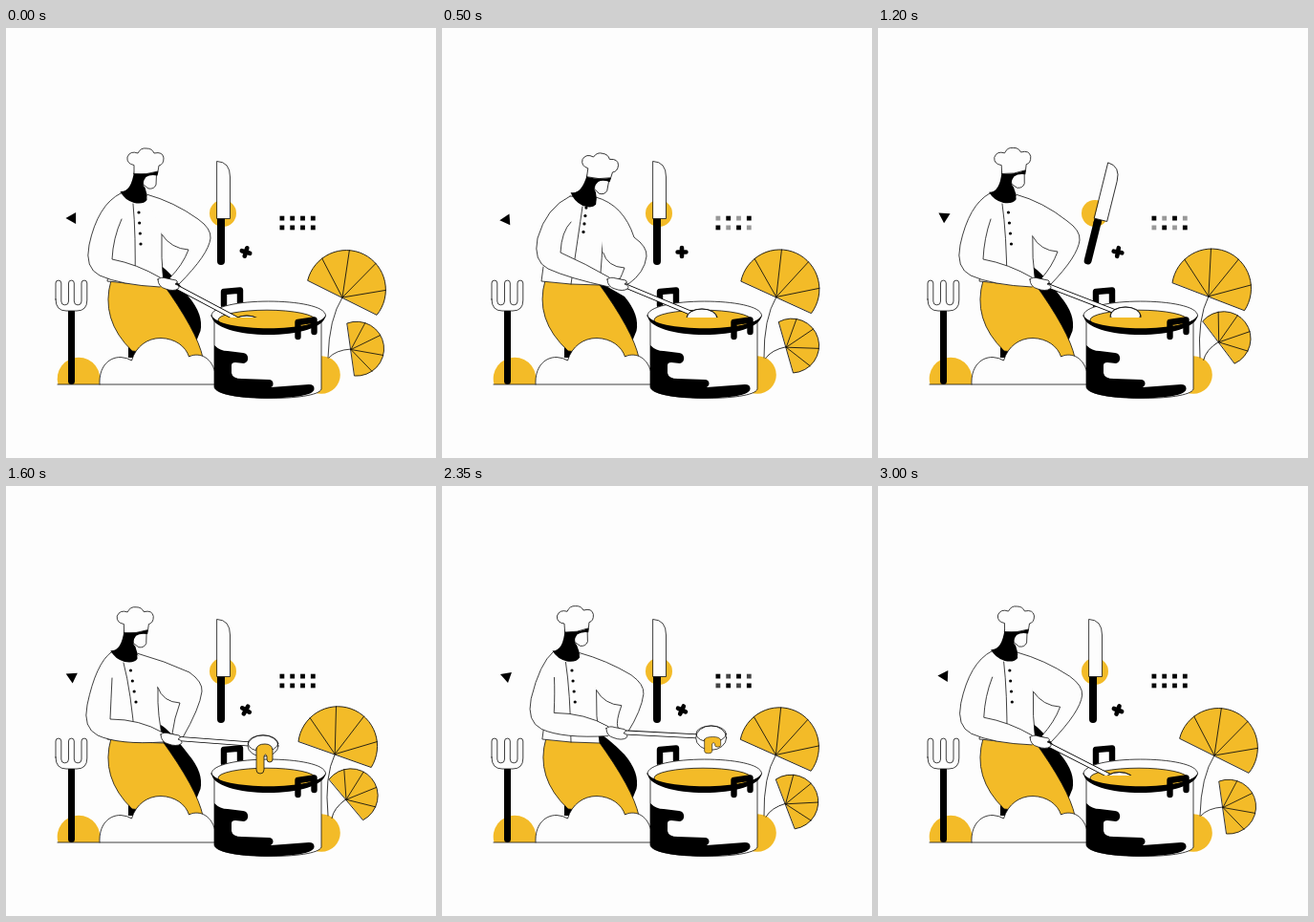
An HTML page that plays this animation: 450x450 px, repeating every 3.05 s.

```html
<!DOCTYPE html>
<html lang="en">
<head>
<meta charset="utf-8">
<title>Cook at the pot</title>
<style>
  html, body { margin: 0; width: 100%; height: 100%; overflow: hidden; background: #fdfdfd; }
  svg { display: block; width: 100%; height: 100%; }
  .line { fill: none; stroke: #111; stroke-width: .8; stroke-linecap: round; stroke-linejoin: round; }
  .white { fill: #fdfdfd; }
  .gold { fill: #f3bb28; }
  .bar { fill: none; stroke: #000; stroke-linecap: round; stroke-linejoin: round; }
</style>
</head>
<body>
<svg viewBox="0 0 450 450">
  <defs>
    <clipPath id="aboveSoup"><path d="M0 0H450V301L300 303H240L0 303Z"/></clipPath>
  </defs>

  <path id="triangle" d="M-7 0 3.6-5.9V5.9Z"/>
  <path id="plus" class="bar" stroke-width="4.6" d="M-4.4 0H4.4M0-4.4V4.4"/>
  <g id="dots"></g>

  <circle class="gold" cx="227" cy="194" r="14"/>
  <g id="knife">
    <path class="bar" stroke-width="8" d="M225 203V244"/>
    <path d="M221 199h8v6h-8z"/>
    <path class="line white" d="M221 139.5Q234.500 140 234.500 156V199.500H221Z"/>
  </g>

  <path class="gold" d="M54.5 373A22.3 22.3 0 1 1 97.5 373Z"/>
  <path class="bar" stroke-width="7" d="M68.5 297V369.5"/>
  <path id="fork" class="line white"/>

  <circle class="gold" cx="330" cy="363" r="19.8"/>
  <g id="bigLeaf"><path class="line" d="M337 345Q338 304 352 282"/></g>
  <g id="smallLeaf"><path class="line" d="M338 345Q345 337 361 336"/></g>

  <path d="M128 322V345H140V330Z"/>
  <path id="hip"/>
  <path id="apron" class="line gold"/>
  <path id="torso" class="line white"/>
  <path id="placket" class="line"/>
  <g id="buttons"></g>
  <path id="rightArm" class="line white"/>

  <path class="line white" d="M98 373C97 355 107 344.500 120 344.500Q127 345 131.500 348C136 333 148 324.500 162 324.500C177 325 188 333 191.500 344C199 340 214 341 219 361V373"/>
  <path class="line" d="M54 373H219"/>

  <path class="white line" d="M218 304V376C222 391 326 391 330 378V304Z"/>
  <path d="M218 332Q224 338 232 338L248 340A5.6 5.6 0 0 1 249 351L240 350Q236 350 236 353V361Q237 367 247 367L276 368A4.2 4.2 0 0 1 277 376L317 373Q323 373 322.500 378Q322 383 306 385.500C275 389.500 222 388 218 376Z"/>
  <path class="bar" stroke-width="6.4" stroke-linejoin="miter" d="M228 290V276L245 274.5V287"/>
  <path class="line white" d="M215 301C215 281 334 281 334.500 301C332 318 218 318 215 301Z"/>
  <ellipse class="gold line" cx="273" cy="305.500" rx="51" ry="10.300"/>
  <path d="M215 300C215 328 334 328 334.500 300C331 319 219 319 215 300Z"/>
  <path class="bar" stroke-width="6.4" stroke-linejoin="miter" d="M305.500 323V308L322.500 305.500V318"/>

  <g clip-path="url(#aboveSoup)">
    <path id="handle" class="bar" stroke-width="5"/>
    <path id="handleCore" class="bar" stroke-width="3.400" style="stroke:#fdfdfd"/>
    <ellipse id="bowl" class="line white" rx="16"/>
    <ellipse id="lip" class="line" rx="15.800" ry="8.500"/>
    <path id="drip" class="gold line" d="M-8 3V25A4 4 0 0 0 0 25V11Q1.500 7 3 11V14A3 3 0 0 0 9 14V4Q8-2 1-2Q-7-2-8 3Z"/>
  </g>

  <path id="leftArm" class="white"/>
  <path id="leftArmLine" class="line"/>
  <path id="hand" class="line white" d="M-10-3Q-7-6-1-4L9-2Q12 0 8 2Q14 4 11 7Q6 10-2 7Q-10 5-10-3Z"/>

  <g id="head">
    <path class="line white" d="M143 153H157.500L157 164Q155 169 149 168L144 164Z"/>
    <path d="M134 150H159.500L158.500 154.500Q151 153 146.500 156Q141 163 145.500 167Q148 173 147.500 180Q144 185 134 183Q124 180 119.500 171Q131 172 134 150Z"/>
    <path class="line white" d="M134 152.500V143.500Q126 142 127 135Q130 128 138 131Q141 125 147 126Q153 126 155 131Q164 129 165 136Q165 143 160 144L159 150Q147 154 134 152.500Z"/>
  </g>
</svg>
<script>
const LOOP = 3050, STEP = 50;
const TIMES = [0, 500, 1200, 1600, 2050, 2700];

// One value per time in TIMES; the list wraps around.
const TRACKS = {
  neckX:   [0, 14, -3, -10, 0, -8],
  neckY:   [0, 3, 0, 1, 0, 1],
  tilt:    [0, 8, -3, -1, -6, -1],
  handX:   [169, 183, 169, 172, 187, 173],
  handY:   [266, 266, 266, 263, 253, 263],
  leftX:   [86, 99, 85, 84, 98, 85],
  leftY:   [235, 228, 235, 237, 226, 236],
  rightX:  [214, 214, 211, 205, 214, 207],
  rightY:  [219, 238, 221, 214, 218, 215],
  hipX:    [0, -2, 0, 0, -2, 0],
  hipTop:  [249, 265, 250, 250, 262, 250],
  bowlX:   [252, 272, 259, 269, 287, 269],
  bowlY:   [311, 304, 302, 272, 256.5, 281.5],
  bowlR:   [10, 10, 10, 11.2, 12.2, 13],
  drip:    [0, 0, 0, 1, 1, 0],
  knife:   [0, 0, 14, 0, 0, 0],
  triX:    [69.5, 67.3, 69.3, 69, 67.3, 68.3],
  triY:    [199, 200.7, 197.3, 199.5, 200.3, 198],
  triTurn: [0, -4, 33, 26, 5, 38],
  plus:    [17, 0, 11, 30, 9, 45],
  dotA:    [1, .4, 1, 1, 1, 1],
  dotB:    [1, 1, .4, 1, 1, .4],
  bigLeaf: [0, -2, -5.5, -7, -4.5, -.5],
  smallLeaf: [0, -8, -29, -32, -24, -2]
};

const $ = id => document.getElementById(id);
const set = (id, attrs) => {
  for (const name in attrs) $(id).setAttribute(name, attrs[name]);
};
const draw = (id, d) => set(id, { d });
const place = (id, transform) => set(id, { transform });

function add(parent, tag, attrs) {
  const el = document.createElementNS('http://www.w3.org/2000/svg', tag);
  for (const name in attrs) el.setAttribute(name, attrs[name]);
  $(parent).append(el);
  return el;
}

// Smooth periodic curve that never overshoots its keys.
function sample(values, t) {
  const n = values.length;
  const time = i => TIMES[(i + n) % n] + LOOP * Math.floor(i / n);
  const value = i => values[(i + n) % n];
  const slope = i => (value(i + 1) - value(i)) / (time(i + 1) - time(i));
  const tangent = i => {
    const a = slope(i - 1), b = slope(i);
    return a * b <= 0 ? 0 : 2 * a * b / (a + b);
  };
  let i = n - 1;
  while (TIMES[i] > t) i--;
  const span = time(i + 1) - time(i), u = (t - time(i)) / span;
  const ease = u * u * (3 - 2 * u);
  return value(i) + (value(i + 1) - value(i)) * ease
    + span * u * (1 - u) * ((1 - u) * tangent(i) - u * tangent(i + 1));
}

// A disc cut by a chord, with ribs fanning out from the chord's middle.
function addFan(parent, x, y, r, turn) {
  const off = r * .215, half = Math.sqrt(r * r - off * off), sectors = 5;
  let ribs = '';
  for (let k = 1; k < sectors; k++) {
    const a = k * Math.PI / sectors, s = Math.sin(a);
    const len = off * s + Math.sqrt(r * r - off * off * (1 - s * s));
    ribs += `M0 0L${-len * Math.cos(a)} ${-len * s}`;
  }
  add(parent, 'path', {
    class: 'line gold',
    transform: `translate(${x} ${y}) rotate(${turn})`,
    d: `M${-half} 0A${r} ${r} 0 1 1 ${half} 0Z${ribs}`
  });
}

addFan('bigLeaf', 352, 282, 41.5, 26.5);
addFan('smallLeaf', 361, 336.5, 28.5, 82);

const tineTop = 'V267a2.9 2.9 0 0 1 5.8 0';
const tineGap = 'V286a3.85 3.85 0 0 0 7.7 0' + tineTop;
draw('fork', `M52 284${tineTop}${tineGap.repeat(2)}V285Q84.800 296 74 296H63Q52 296 52 284Z`);

const dots = [];
for (let k = 0; k < 8; k++) {
  const col = k % 4, row = k >> 2;
  dots.push(add('dots', 'rect', { x: 286.5 + col * 10.8, y: 196.7 + row * 9.8, width: 4.8, height: 4.8 }));
}
const buttons = [0, 1, 2, 3].map(() => add('buttons', 'circle', { r: 1.6 }));

function drawCook(p) {
  const nx = 134 + p.neckX, ny = 178 + p.neckY;
  const lean = p.neckX / 2, bend = Math.max(0, p.neckX);
  const { handX: wx, handY: wy, leftX: lx, leftY: ly, rightX: rx, rightY: ry } = p;
  const sideX = 163 + lean * .8, hemX = 110 + p.hipX;

  draw('hip', `M162 ${p.hipTop}Q${172 - p.hipX} ${p.hipTop + 6} 191 281Q207 300 203.500 317L199 328L160 280Z`);
  draw('apron', `M${hemX} 264Q${hemX - 12} 305 132 338L206 345Q200 317 163 266Z`);
  draw('torso', `M${nx - 14} ${ny - 5}L${nx + 13} ${ny - 3}Q${sideX} 190 ${sideX} 213Q${sideX - 1} 240 165 269Q135 269 ${hemX - 4} 265L${hemX - 2} 250`);
  draw('placket', `M${nx - 1} ${ny + 6}Q${136 + lean} 215 135 268`);

  buttons.forEach((b, k) => {
    const u = k / 3;
    b.setAttribute('cx', 139 + .85 * p.neckX + u * (2 + lean - .85 * p.neckX));
    b.setAttribute('cy', 193 - .35 * bend + u * (33 - .55 * bend));
  });

  const ix = rx - 23, iy = ry + 13;
  draw('rightArm', `M${nx + 13} ${ny - 4}Q${nx + 42} ${ny + 4} ${rx - 13} ${ry - 19}Q${rx + 1} ${ry - 9} ${rx} ${ry + 1}Q${rx - 2} ${ry + 18} ${wx + 12} ${wy + 2}L${wx + 2} ${wy - 4}Q${ix - 6} ${iy + 16} ${ix} ${iy}Q${ix - 18} ${iy - 1} ${sideX} ${iy - 16}`);

  const outer = `M${nx - 14} ${ny - 5}Q${lx + 10} ${ny + 7} ${lx + 1} ${ly - 8}Q${lx - 4} ${ly + 16} ${lx + 12} ${ly + 24}Q${lx + 34} ${ly + 34} ${wx - 8} ${wy + 5}`;
  const inner = `Q${wx - 32} ${wy - 19} ${lx + 25} ${ly + 7}Q${lx + 26} ${ly - 15} ${nx - 13} ${ny + 22}`;
  draw('leftArm', `${outer}L${wx - 8} ${wy - 5}${inner}Z`);
  draw('leftArmLine', `${outer}M${wx - 8} ${wy - 5}${inner}`);
  place('hand', `translate(${wx} ${wy})`);
  place('head', `translate(${p.neckX} ${p.neckY}) rotate(${p.tilt} 134 178)`);

  const stick = `M${wx + 2} ${wy + 1}L${p.bowlX} ${p.bowlY - 1}`;
  draw('handle', stick);
  draw('handleCore', stick);
  set('bowl', { cx: p.bowlX, cy: p.bowlY, ry: p.bowlR });
  set('lip', { cx: p.bowlX, cy: p.bowlY - p.bowlR + 8.5 });
  set('drip', {
    transform: `translate(${p.bowlX + 1} ${p.bowlY}) scale(1 ${p.drip})`,
    visibility: p.drip > .02 ? 'visible' : 'hidden'
  });
}

function render(t) {
  const p = {};
  for (const name in TRACKS) p[name] = sample(TRACKS[name], t);
  drawCook(p);
  place('knife', `rotate(${p.knife} 225 222)`);
  place('triangle', `translate(${p.triX} ${p.triY}) rotate(${p.triTurn})`);
  place('plus', `translate(251 234.5) rotate(${p.plus})`);
  place('bigLeaf', `rotate(${p.bigLeaf} 337 345)`);
  place('smallLeaf', `rotate(${p.smallLeaf} 344 341)`);
  dots.forEach((dot, k) => {
    dot.setAttribute('opacity', (k + (k >> 2)) % 2 ? p.dotB : p.dotA);
  });
}

const start = performance.now();
function tick() {
  const t = (performance.now() - start) % LOOP;
  render(Math.floor(t / STEP) * STEP);
  requestAnimationFrame(tick);
}
tick();
</script>
</body>
</html>
```
